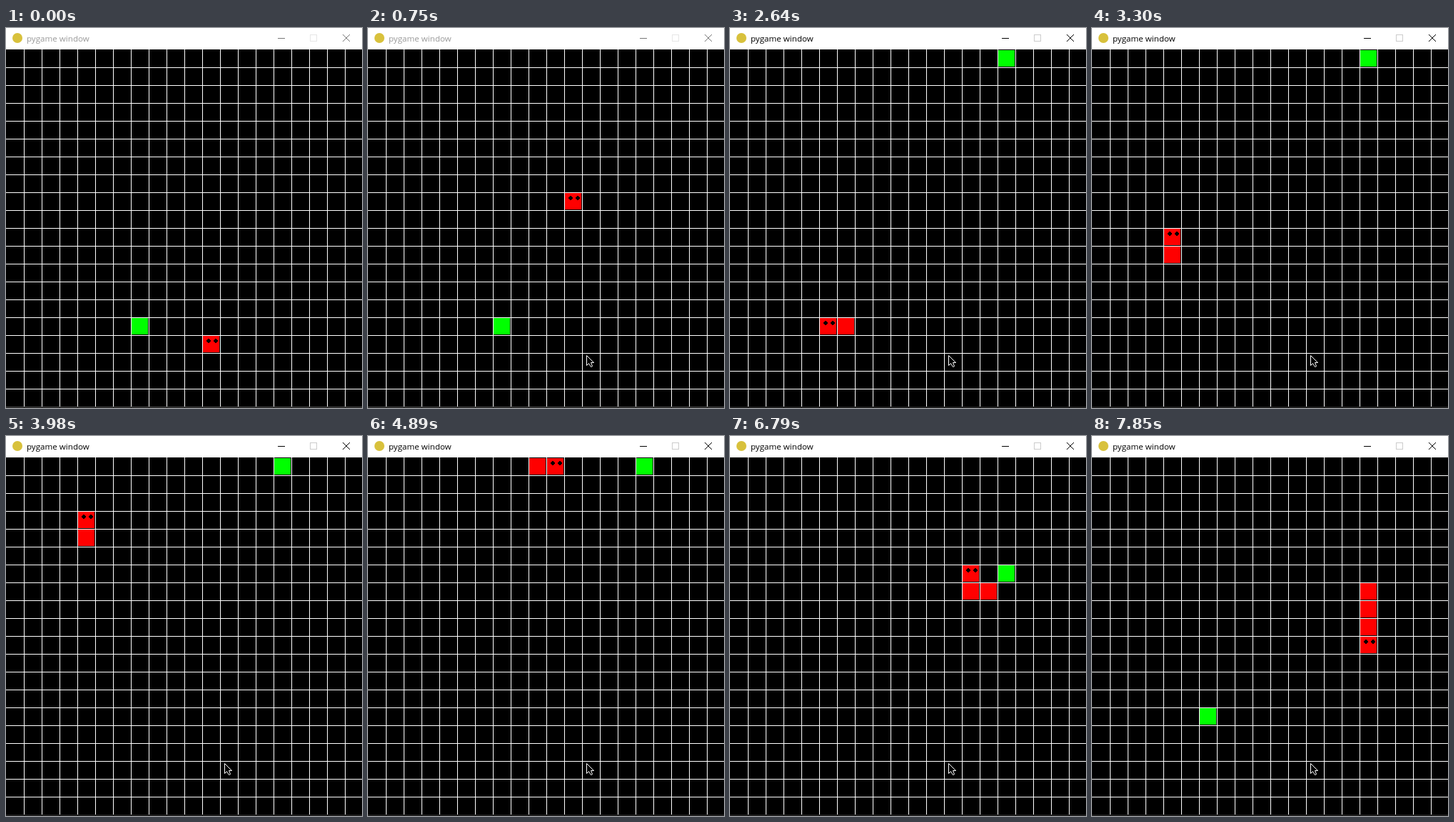
Write an HTML page with a canvas that moves like this. It is 499 by 532 pixels and loops after 7990 ms.

```html
<!DOCTYPE html>
<html lang="en">
<head>
<meta charset="utf-8">
<title>Snake</title>
<style>
  html, body { margin: 0; width: 100%; height: 100%; overflow: hidden; background: #000; }
  canvas { position: absolute; left: 0; top: 0; display: block; }
  #title {
    position: absolute; left: 29px; top: 0;
    font: 11.6px/30px "Open Sans", "Noto Sans", sans-serif;
    white-space: pre;
  }
</style>
</head>
<body>
<canvas id="stage" width="499" height="532"></canvas>
<div id="title">pygame window</div>
<script>
const ctx = document.getElementById('stage').getContext('2d');
const title = document.getElementById('title');

const W = 499, H = 532, BAR = 30, CELL = 25, N = 20;
const LOOP = 7990, FOCUS_AT = 1720;

const DIRS = { U: [0, -1], D: [0, 1], L: [-1, 0], R: [1, 0], '.': [0, 0] };
const START = [11, 16];
const FOODS = [[7, 15], [15, 0], [15, 6], [6, 14]];

// Bursts of evenly spaced moves: first time, last time, directions.
const BURSTS = [
  [70, 200, 'UUU'], [360, 610, 'UUUU'], [750, 910, 'UUU'], [1060, 1300, 'UUUU'],
  [1480, 1940, 'UUU.UUU'], [2120, 2250, 'ULL'], [2400, 2400, 'LL'], [2560, 2640, 'LL'],
  [2800, 3030, 'LUUU'], [3210, 3340, 'UUU'], [3490, 3650, 'UUU'],
  [3800, 4430, 'UUUUUURR'], [4610, 4740, 'RRR'], [4890, 5070, 'RRR'],
  [5210, 5440, 'RRRR'], [5600, 5760, 'RDD'], [5930, 6570, 'DDDDDLLL'],
  [6710, 6790, 'LU'], [6940, 7120, 'UUR'], [7260, 7580, 'RDDDD'], [7760, 7850, 'DD']
];

const moves = BURSTS.flatMap(([from, to, dirs]) => [...dirs].map((dir, i) => ({
  at: Math.round((from + (to - from) * i / (dirs.length - 1)) / 10) * 10,
  dir
})));

// Pointer positions: start time, x, y.
const POINTER = [[70, 314, 470], [130, 308, 463], [360, 306, 458]];
const ARROW = [[0, 0], [0, 14], [3, 11], [6, 16], [8, 15], [6, 10], [10, 10]];

function snakeAt(t) {
  const trail = [START];
  let length = 1, food = 0;
  for (const { at, dir } of moves) {
    if (at > t) break;
    if (dir === '.') continue;
    const [dx, dy] = DIRS[dir];
    const [x, y] = trail[0];
    const head = [(x + dx + N) % N, (y + dy + N) % N];
    trail.unshift(head);
    if (head[0] === FOODS[food][0] && head[1] === FOODS[food][1]) {
      length++;
      food++;
    }
  }
  return { body: trail.slice(0, length), food: FOODS[food] };
}

function rect(color, x, y, w, h) {
  ctx.fillStyle = color;
  ctx.fillRect(x, y, w, h);
}

function cube([col, row], color) {
  rect(color, col * CELL + 1, BAR + row * CELL + 1, CELL - 2, CELL - 2);
}

function eye(x, y) {
  [1, 2, 3, 3, 2, 1].forEach((r, i) => rect('#000', x - r, y - 3 + i, 2 * r, 1));
}

function line(...points) {
  ctx.beginPath();
  points.forEach(([x, y]) => ctx.lineTo(x, y));
  ctx.stroke();
}

function drawBar(active) {
  rect('#fff', 0, 0, W, BAR);
  ctx.fillStyle = '#d8c13c';
  ctx.beginPath();
  ctx.arc(16, 14, 7, 0, Math.PI * 2);
  ctx.fill();

  const ink = active ? '#000' : '#999';
  title.style.color = ink;
  rect(active ? '#000' : '#777', 381, 14, 10, 1);
  ctx.lineWidth = 1;
  ctx.strokeStyle = active ? '#ccc' : '#e6e6e6';
  ctx.strokeRect(426.5, 9.5, 9, 9);
  ctx.strokeStyle = active ? '#000' : '#777';
  line([472, 9], [482, 19]);
  line([482, 9], [472, 19]);
}

function drawPointer(t) {
  const spot = POINTER.filter(p => p[0] <= t).pop();
  if (!spot) return;
  ctx.beginPath();
  ARROW.forEach(([x, y]) => ctx.lineTo(spot[1] + x + 0.5, spot[2] + y + 0.5));
  ctx.closePath();
  ctx.fillStyle = '#000';
  ctx.fill();
  ctx.strokeStyle = '#fff';
  ctx.stroke();
}

function draw(t) {
  const active = t >= FOCUS_AT;
  const { body, food } = snakeAt(t);

  rect('#000', 0, 0, W, H);
  body.forEach(c => cube(c, '#f00'));
  const hx = body[0][0] * CELL, hy = BAR + body[0][1] * CELL + 8;
  eye(hx + 9, hy);
  eye(hx + 19, hy);
  cube(food, '#0f0');

  for (let k = 1; k < N; k++) {
    rect('#fff', k * CELL, BAR, 1, N * CELL);
    rect('#fff', 0, BAR + k * CELL, W, 1);
  }
  rect(active ? '#222' : '#484848', 0, 530, W, 1);
  rect('#1e1e1e', 0, 531, W, 1);

  drawBar(active);
  drawPointer(t);
}

const begin = performance.now();
function tick() {
  draw((performance.now() - begin) % LOOP);
  requestAnimationFrame(tick);
}
tick();
</script>
</body>
</html>
```
